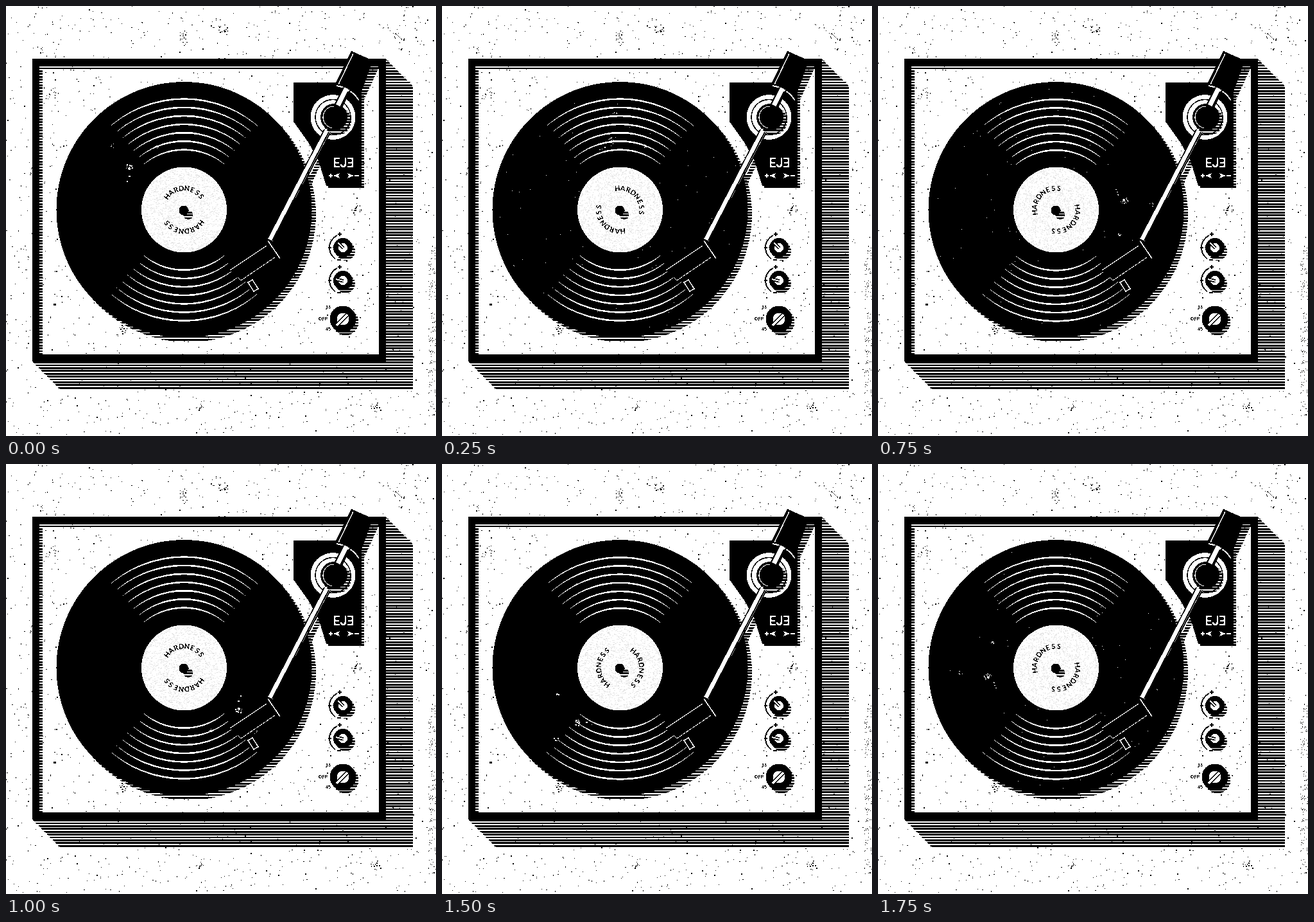
Recreate the animation shown at these times as an HTML page with a canvas. Size 670 by 669 pixels, loop 2 s.

```html
<!DOCTYPE html>
<html lang="en">
<head>
<meta charset="utf-8">
<title>Turntable</title>
<style>
html, body { margin: 0; width: 100%; height: 100%; overflow: hidden; background: #fff; }
canvas { display: block; }
</style>
</head>
<body>
<canvas id="stage" width="670" height="669"></canvas>
<script>
const W = 670, H = 669, CX = 277.5, CY = 317;
const ctx = document.getElementById('stage').getContext('2d', { willReadFrequently: true });
const BLACK = '#000', WHITE = '#fff';

let seed = 7;
const rnd = () => (seed = seed * 16807 % 2147483647) / 2147483647;

// Five lines per 22 px tile
function makeHatch() {
  const tile = document.createElement('canvas');
  tile.width = tile.height = 22;
  const t = tile.getContext('2d');
  for (let i = 0; i < 6; i++) t.fillRect(0, i * 4.4 - 1.1, 22, 2.6);
  return ctx.createPattern(tile, 'repeat');
}
const HATCH = makeHatch();

function fill(color, d) {
  ctx.fillStyle = color;
  ctx.fill(new Path2D(d), 'evenodd');
}
function line(color, width, d, dash = []) {
  ctx.strokeStyle = color;
  ctx.lineWidth = width;
  ctx.setLineDash(dash);
  ctx.stroke(new Path2D(d));
}
function disc(color, x, y, r) {
  ctx.fillStyle = color;
  ctx.beginPath();
  ctx.arc(x, y, r, 0, 7);
  ctx.fill();
}
function arc(color, width, x, y, r, from, to) {
  ctx.strokeStyle = color;
  ctx.lineWidth = width;
  ctx.setLineDash([]);
  ctx.beginPath();
  ctx.arc(x, y, r, from * Math.PI / 180, to * Math.PI / 180);
  ctx.stroke();
}
function text(color, font, s, x, y) {
  ctx.fillStyle = color;
  ctx.font = font;
  ctx.textAlign = 'center';
  ctx.textBaseline = 'middle';
  ctx.fillText(s, x, y);
}
function dots(color, list) {
  ctx.fillStyle = color;
  for (const [x, y, w = 1, h = 1] of list) ctx.fillRect(x, y, w, h);
}

// Grit: lists of [x, y, w, h]
const cluster = (x, y, n, spread) => Array.from({ length: n }, () =>
  [Math.round(x + (rnd() + rnd() - 1) * spread), Math.round(y + (rnd() + rnd() - 1) * spread),
   1 + (rnd() < .4), 1 + (rnd() < .4)]);
const polar = (n, r0, r1) => Array.from({ length: n }, () => {
  const a = rnd() * 2 * Math.PI, r = Math.sqrt(r0 * r0 + rnd() * (r1 * r1 - r0 * r0));
  return [Math.round(r * Math.cos(a)), Math.round(r * Math.sin(a))];
});

const paperGrit = Array.from({ length: 1800 }, () =>
  [rnd() * W | 0, rnd() * H | 0, 1 + (rnd() < .25), 1 + (rnd() < .25)]);
for (const [x, y] of [[275, 46], [340, 36], [612, 47], [300, 622], [576, 622],
                      [180, 505], [547, 316], [70, 135]])
  paperGrit.push(...cluster(x, y, 14, 10));
paperGrit.push([74, 463, 4, 3]);
for (let i = 0; i < 130; i++) paperGrit.push([658 + rnd() * 12 | 0, 380 + rnd() * 260 | 0]);

const vinylGrit = [...polar(110, 70, 196), ...cluster(-86, -67, 18, 9),
  ...cluster(-42, -97, 5, 5), ...cluster(-113, -102, 5, 6), ...cluster(-88, -49, 5, 6)];
const labelGrain = polar(1600, 0, 65);

function cabinet() {
  fill(HATCH, 'M592 82L634 125V596H84L41 553H592Z');
  fill(BLACK, 'M41 82H592V553H41ZM52 93H581V542H52Z');
  fill(HATCH, 'M52 93H581V99H52ZM52 99H57V542H52Z');
  dots(BLACK, paperGrit);
}

// Tapered highlights above and below the label; the warped disc lifts them twice a turn
function grooves(angle) {
  const wobble = .5 - .5 * Math.cos(2 * angle - Math.PI / 4);
  for (let i = 0; i < 7; i++) {
    const r = 95 + i * 13.15, k = Math.SQRT1_2, h = r * k;
    const sag = r * (1 - k) - 2.6, r2 = (h * h + sag * sag) / (2 * sag);
    for (const s of [-1, 1]) {
      const y = CY + s * h + wobble, a = s < 0 ? 1 : 0;
      fill(WHITE, `M${CX - h} ${y}A${r} ${r} 0 0 ${a} ${CX + h} ${y}A${r2} ${r2} 0 0 ${1 - a} ${CX - h} ${y}Z`);
    }
  }
}

function record(angle) {
  disc(HATCH, 284, 324, 199);
  disc(BLACK, CX, CY, 199);
  grooves(angle);
  disc(WHITE, CX, CY, 66.5);
  ctx.save();
  ctx.translate(CX, CY);
  ctx.rotate(angle);
  dots(WHITE, vinylGrit);
  for (let side = 0; side < 2; side++) {
    [...'HARDNESS'].forEach((ch, i) => {
      ctx.save();
      ctx.rotate(side * Math.PI + (i - 3.5) * 15 * Math.PI / 180);
      text(BLACK, 'bold 11px Lato, sans-serif', ch, 0, -33);
      ctx.restore();
    });
  }
  ctx.restore();
  disc(HATCH, 284, 325, 7.5);
  disc(BLACK, 277, 318, 7.5);
}

function plinth() {
  fill(HATCH, 'M456 123H558V283H502L492 246Z');
  fill(BLACK, 'M448 119H554V280H499L487 241L471 212L448 180Z');
  text(WHITE, 'bold 20px Roboto, "Noto Sans", sans-serif', 'EJ\u018E', 526, 245);
  line(WHITE, 1.5, 'M503 264H509M506 261V267M543 264H550');
  fill(WHITE, 'M510 264L520 260L518 264L520 268ZM542 264L532 260L534 264L532 268Z');
}

function knob(x, y, r, face) {
  disc(HATCH, x + 4, y + 5, r);
  disc(BLACK, x, y, r);
  disc(WHITE, x, y, face);
}
function pointer(d, width) {
  line(BLACK, width + 3, d);
  line(WHITE, width, d);
}
function knobs() {
  for (const [y, d] of [[376, 'M517 368L526 377'], [427, 'M514 425L526 428']]) {
    arc(BLACK, 2, 525, y, 21, 125, 245);
    line(BLACK, 1.8, `M517 ${y - 21}H523M520 ${y - 24}V${y - 18}M516 ${y + 19}H522M502 ${y}H507`);
    knob(525, y, 15, 7);
    pointer(d, 2);
  }
  knob(525, 487, 20.5, 9.5);
  pointer('M515 497L532 480', 3);
  const font = 'bold 7px "Liberation Sans", sans-serif';
  text(BLACK, font, '33', 502, 469);
  text(BLACK, font, 'OFF', 494, 487);
  text(BLACK, font, '45', 502, 503);
}

function tonearm() {
  // Counterweight
  fill(HATCH, 'M568 84H581V96L557 148L545 136Z');
  fill(BLACK, 'M538 70L572 85L551 140L535 130L512 123Z');
  line(WHITE, 1.5, 'M541 74L518 122');
  line(WHITE, 1.8, 'M515 124Q538 128 550 147');

  // Pivot
  disc(WHITE, 509.5, 173, 35);
  arc(BLACK, 1.6, 509.5, 173, 27.5, 0, 360);
  disc(HATCH, 516, 179, 22);
  disc(BLACK, 511, 173, 21);
  arc(WHITE, 1.2, 511, 173, 17, 100, 270);
  line(BLACK, 13, 'M531 129L518 155');
  line(WHITE, 9, 'M531 129L518 155');
  line(BLACK, 1.5, 'M533 133L521 157');

  // Tube
  fill(HATCH, 'M497 216L504 219L476 276H468Z');
  line(BLACK, 12, 'M501 194L413 363');
  line(WHITE, 8.5, 'M501 194L412 364');
  line(BLACK, 1.8, 'M503 196L415 365');

  // Headshell
  fill(BLACK, 'M349 411L409 369L427 393L366 428Z');
  line(WHITE, 1.2, 'M349 411L406 373');
  line(WHITE, 1.5, 'M408 365L427 393');
  line(WHITE, 1.2, 'M361 422L366 427L419 391', [5, 1]);
  fill(BLACK, 'M374 429L384 424L395 441L386 447Z');
  line(WHITE, 1.5, 'M377 430L384 426L393 440L386 444Z');
}

// Pure black and white, like a coarse print
function harden() {
  const image = ctx.getImageData(0, 0, W, H), px = image.data;
  for (let i = 0; i < px.length; i += 4)
    px[i] = px[i + 1] = px[i + 2] = px[i] < 128 ? 0 : 255;
  ctx.putImageData(image, 0, 0);
}

function draw(step) {
  const angle = step * Math.PI / 4;
  ctx.fillStyle = WHITE;
  ctx.fillRect(0, 0, W, H);
  cabinet();
  record(angle);
  plinth();
  knobs();
  tonearm();
  harden();

  ctx.save();
  ctx.translate(CX, CY);
  ctx.rotate(angle);
  ctx.globalCompositeOperation = 'darken';
  dots('#d4d4d4', labelGrain);
  ctx.restore();
}

let shown = -1;
function tick() {
  const step = Math.floor(performance.now() / 250) % 8;
  if (step !== shown) draw(shown = step);
  requestAnimationFrame(tick);
}
tick();
</script>
</body>
</html>
```
